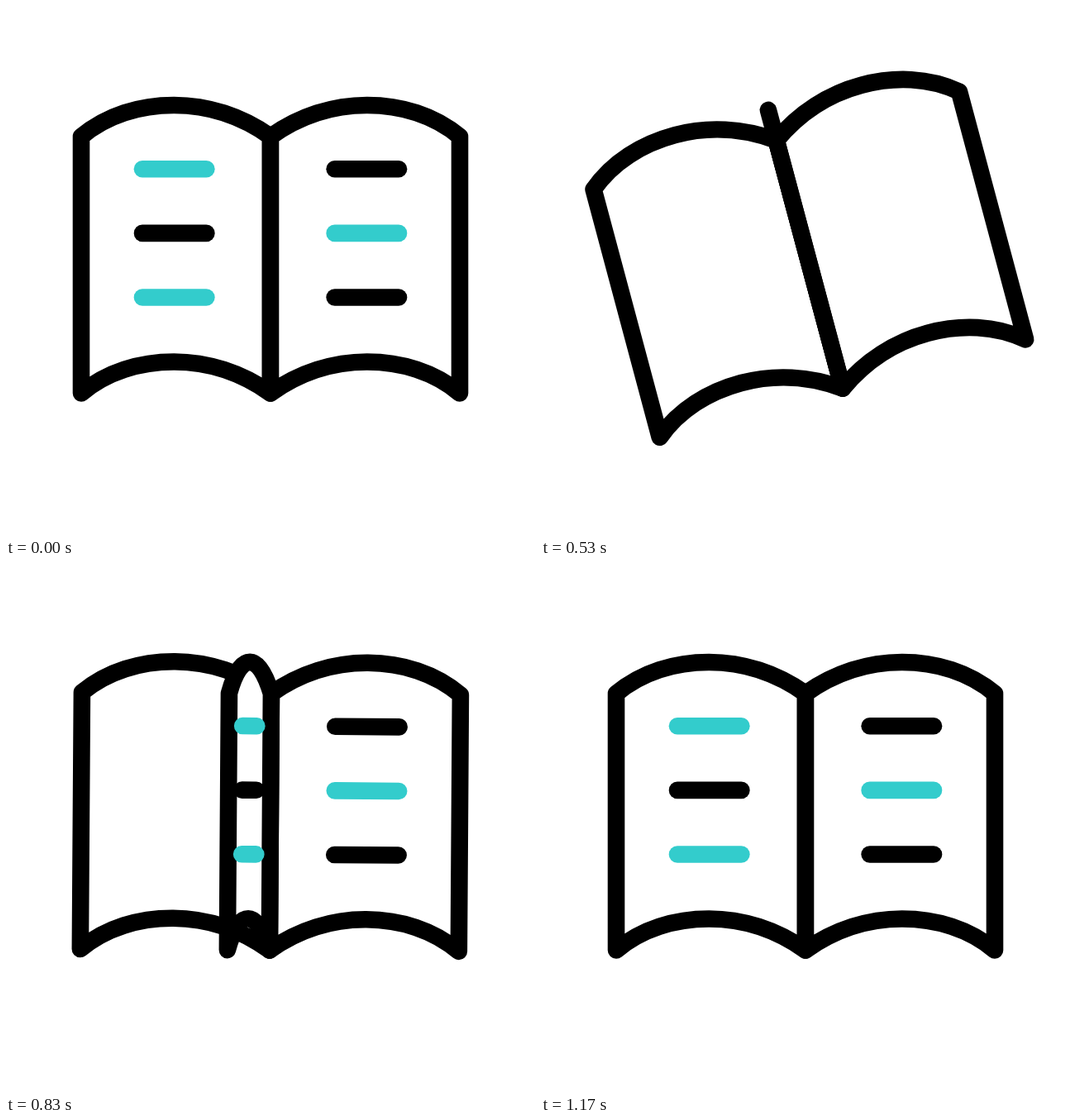
An HTML page with a canvas that plays this animation: 640x640 px, repeating every 1500 ms.

```html
<!DOCTYPE html>
<html lang="en">
<head>
<meta charset="utf-8">
<title>Turning pages</title>
<style>
  html, body { margin: 0; width: 100%; height: 100%; overflow: hidden; background: #fff; }
  canvas { display: block; }
</style>
</head>
<body>
<canvas id="stage" width="640" height="640"></canvas>
<script>
const ctx = document.getElementById('stage').getContext('2d');

const LOOP = 1500;
const FPS = 30;
const TURN = 14; // steps one leaf needs to turn
const STARTS = [0, 9, 17];
const FRONTS = [true, true, false, true]; // which right-hand pages carry lines
const BACKS = [true, false, false, true]; // which left-hand pages carry lines

const SPINE = 320, TOP = 158, HEIGHT = 310.5, WIDTH = 229, PIVOT = 294.5;
const BLACK = '#000', TEAL = '#33cccc';

// Tilt of the book: [step, degrees, degrees per step]
const TILT = [
  [0, 0, -0.75], [11, -14.8, -1.9], [14.1, -18.5, 0], [22.2, 6.8, 0],
  [26.9, -3.2, 0], [31.9, 2.5, 0], [35, 0, 0]
];

const smooth = p => p * p * (3 - 2 * p);

function tiltAt(step) {
  const next = TILT.findIndex(key => key[0] > step);
  if (next < 0) return 0;
  const [t0, a, va] = TILT[next - 1];
  const [t1, b, vb] = TILT[next];
  const span = t1 - t0, p = (step - t0) / span, q = 1 - p;
  return a + (b - a) * smooth(p) + span * p * q * (va * q - vb * p);
}

// side runs from 1 (flat right) through 0 (edge-on) to -1 (flat left)
function drawPage(side, hasLines) {
  const x = u => SPINE + side * u * WIDTH;
  const bottom = TOP + HEIGHT;

  ctx.beginPath();
  ctx.moveTo(x(0), TOP);
  ctx.bezierCurveTo(x(0.153), TOP - 25, x(0.332), TOP - 38, x(0.51), TOP - 38);
  ctx.bezierCurveTo(x(0.69), TOP - 38, x(0.865), TOP - 26, x(1), TOP);
  ctx.lineTo(x(1), bottom);
  ctx.bezierCurveTo(x(0.865), bottom - 26, x(0.69), bottom - 38, x(0.51), bottom - 38);
  ctx.bezierCurveTo(x(0.332), bottom - 38, x(0.153), bottom - 25, x(0), bottom);
  ctx.closePath();
  ctx.fillStyle = '#fff';
  ctx.fill();
  ctx.strokeStyle = BLACK;
  ctx.stroke();

  if (!hasLines) return;
  for (let row = 0; row < 3; row++) {
    const y = 197.3 + row * 77.6;
    ctx.strokeStyle = (row === 1) === (side > 0) ? TEAL : BLACK;
    ctx.beginPath();
    ctx.moveTo(x(0.339), y);
    ctx.lineTo(x(0.677), y);
    ctx.stroke();
  }
}

function draw(step) {
  ctx.setTransform(1, 0, 0, 1, 0, 0);
  ctx.fillStyle = '#fff';
  ctx.fillRect(0, 0, 640, 640);
  ctx.translate(SPINE, PIVOT);
  ctx.rotate(tiltAt(step) * Math.PI / 180);
  ctx.translate(-SPINE, -PIVOT);
  ctx.lineWidth = 20.6;
  ctx.lineCap = ctx.lineJoin = 'round';

  const started = STARTS.filter(s => step > s).length;
  const turned = STARTS.filter(s => step >= s + TURN).length;
  drawPage(-1, BACKS[turned]);
  drawPage(1, FRONTS[started]);
  for (let leaf = turned; leaf < started; leaf++) {
    const turn = (step - STARTS[leaf]) / TURN;
    const hasLines = turn < 0.5 ? FRONTS[leaf] : turn > 0.5 && BACKS[leaf + 1];
    drawPage(Math.cos(turn * Math.PI), hasLines);
  }
}

const begin = performance.now();
function tick() {
  const time = (performance.now() - begin) % LOOP;
  // Steps fall on whole hundredths of a second, hence the small lead.
  draw(Math.floor((time + 3.4) * FPS / 1000) % (LOOP * FPS / 1000));
  requestAnimationFrame(tick);
}
tick();
</script>
</body>
</html>
```
